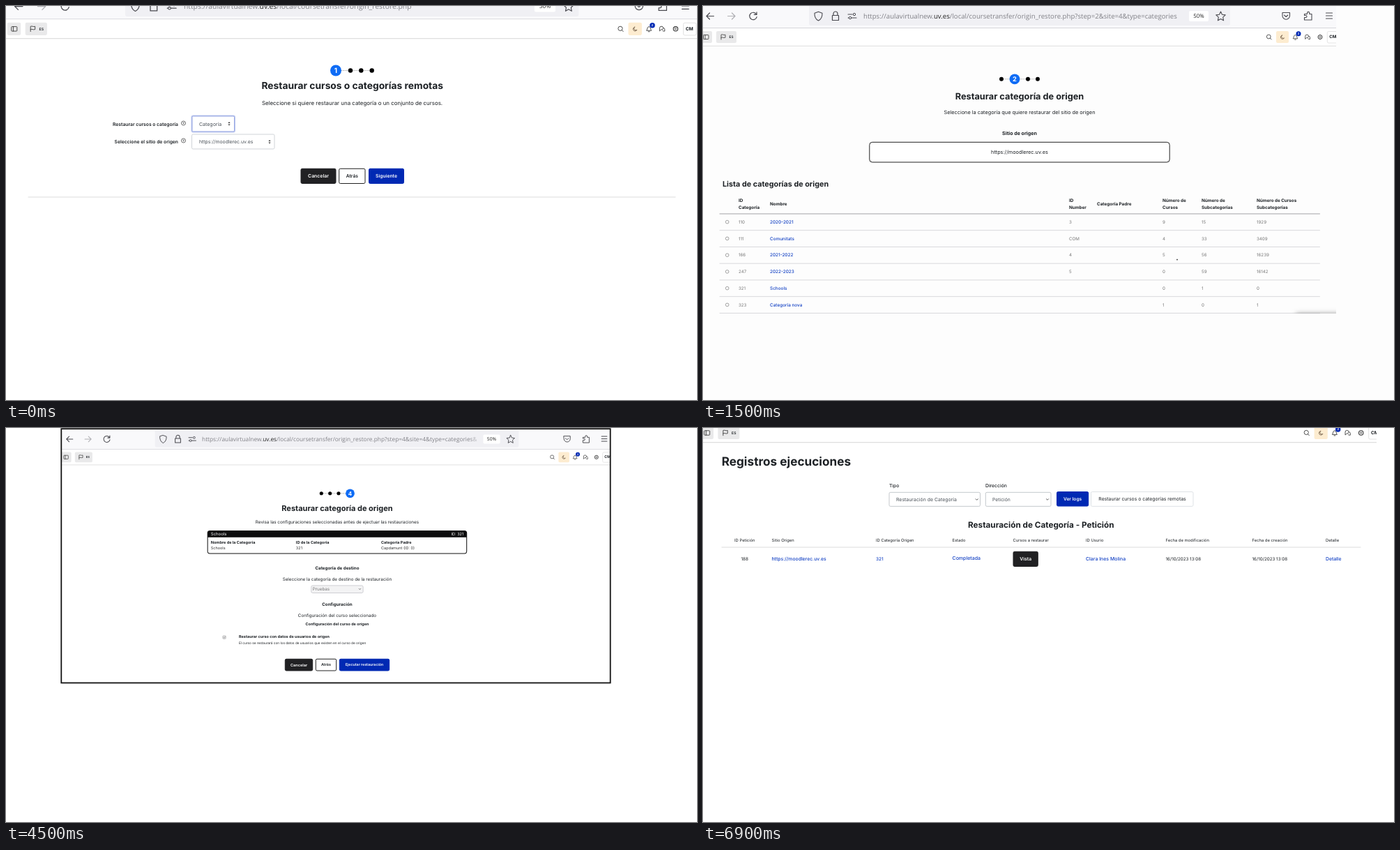
Recreate the animation shown at these times as an HTML page. Size 991 by 565 pixels, loop 7500 ms.

```html
<!DOCTYPE html>
<html lang="es">
<head>
<meta charset="utf-8">
<title>Restaurar cursos</title>
<style>
  html, body { margin: 0; width: 100%; height: 100%; overflow: hidden; background: #fff; }
  svg { display: block; width: 991px; height: 565px; }
  text { font-family: Inter, "Open Sans", sans-serif; text-rendering: geometricPrecision; white-space: pre; }
  .ui { font-family: "Open Sans", "Noto Sans", sans-serif; }
</style>
</head>
<body>
<svg id="stage" viewBox="0 0 991 565" xmlns="http://www.w3.org/2000/svg"></svg>
<script>
const INK = '#1d2125', DARK = '#212123', BLUE = '#0029b3', LINK = '#1240c4', GREY = '#777';
const WHITE = '#fff', PAPER = '#fdfdfd';
const SCENE_MS = 1500;

// y is the optical middle of the text
function text(x, y, str, size, { w = 400, fill = INK, at = 'start', cls = '' } = {}) {
  return `<text x="${x}" y="${y + size * 0.34}" font-size="${size}" font-weight="${w}" fill="${fill}" text-anchor="${at}" class="${cls}">${str}</text>`;
}
const mid = (x, y, str, size, o = {}) => text(x, y, str, size, { at: 'middle', ...o });
const bold = (x, y, str, size, o = {}) => text(x, y, str, size, { w: 700, ...o });
const title = (x, y, str, size, fill = INK) => mid(x, y, str, size, { w: 700, fill });

// box given by its edges
function box(x1, y1, x2, y2, fill, stroke = 'none', r = 0, sw = 1) {
  return `<rect x="${x1}" y="${y1}" width="${x2 - x1}" height="${y2 - y1}" rx="${r}" fill="${fill}" stroke="${stroke}" stroke-width="${sw}"/>`;
}
const path = (d, stroke = '#333', sw = 1, fill = 'none', dash = 'none') =>
  `<path d="${d}" fill="${fill}" stroke="${stroke}" stroke-width="${sw}" stroke-dasharray="${dash}" stroke-linecap="round" stroke-linejoin="round"/>`;
const dot = (x, y, r, fill, stroke = 'none', sw = 1) =>
  `<circle cx="${x}" cy="${y}" r="${r}" fill="${fill}" stroke="${stroke}" stroke-width="${sw}"/>`;
const rule = (x1, x2, y, color = '#dcdcdc', sw = 1) => path(`M${x1} ${y}H${x2}`, color, sw);
const chevron = (x, y) => path(`M${x - 1.6} ${y - 0.8}l1.6 1.6 1.6-1.6`, '#333', 0.8);
const sorter = (x, y) => path(`M${x - 1.6} ${y - 0.7}l1.6-2 1.6 2zM${x - 1.6} ${y + 0.7}l1.6 2 1.6-2z`, 'none', 0, '#333');

function button(x1, y1, x2, y2, str, size, fill) {
  const plain = fill === WHITE;
  return box(x1, y1, x2, y2, fill, plain ? '#222' : fill, 1.8) +
    mid((x1 + x2) / 2, (y1 + y2) / 2, str, size, { w: 600, fill: plain ? INK : WHITE });
}

function help(x, y) {
  return dot(x, y, 3, 'none', '#333', 0.7) + mid(x, y, '?', 4.6, { w: 600 });
}

function steps(xs, y, current, r) {
  return path(`M${xs[0]} ${y}H${xs[3]}`, '#999', 0.7, 'none', '1 1.6') +
    xs.map((x, i) => i + 1 === current
      ? dot(x, y, r, '#0f6cf5') + title(x, y, current, r * 1.25, WHITE)
      : dot(x, y, r * 0.4, '#000')).join('');
}

function browserBar(query, fade) {
  const ic = '#4a4a50';
  const host = '<tspan fill="#222">uv.es</tspan>';
  const url = `https://aulavirtualnew.${host}/local/coursetransfer/origin_restore.php${query}`;
  return box(-60, -5, 1000, 31, '#f9f9fb') + box(152, -1, 756, 28, '#f0f0f4', 'none', 3) +
    rule(-60, 1000, 31.5, '#d6d6da') +
    path('M15.5 14.5H5M9.5 10L5 14.5 9.5 19', ic, 1.2) +
    path('M35.5 14.5H46M41.5 10L46 14.5 41.5 19', '#b0b0b4', 1.2) +
    path('M76.6 12a5.2 5.2 0 1 0 .5 3.6M77 8.8V12.4H73.4', ic, 1.2) +
    path('M165.5 8.3L171 10.2C171.2 15.5 169.3 19 165.5 21 161.7 19 159.8 15.5 160 10.2Z', ic, 1.1) +
    path('M185.5 13.5H194.5V20.5H185.5ZM187 13.5V11a3 3 0 0 1 6 0V13.5', ic, 1.2) +
    path('M208 12H214M208 17H209M213 17H220', ic, 1.1) +
    dot(217, 12, 1.7, 'none', ic) + dot(211, 17, 1.7, 'none', ic) +
    text(230, 14.5, url, 9.64, { fill: '#818187', cls: 'ui' }) +
    (fade ? box(674, 3, 692, 26, 'url(#fade)') : '') +
    box(697, 7, 725, 22, WHITE, 'none', 2) + mid(711, 14.5, '50%', 7.8, { fill: '#222', cls: 'ui' }) +
    path('M742.5 8l2 4.3 4.7.6-3.5 3.2.9 4.7-4.1-2.3-4.1 2.3.9-4.7-3.5-3.2 4.7-.6Z', ic, 1.1) +
    path('M831 9.5H841.5V14a5.2 5.2 0 0 1-10.5 0ZM833.5 13l2.7 2.5 2.7-2.5', ic, 1.1) +
    path('M862.5 20V16.5h2a1.5 1.5 0 0 0 0-3h-2V11.5h4V10a1.6 1.6 0 0 1 3.2 0V11.5H873V20Z', ic, 1.1) +
    path('M893.5 10H902.5M893.5 14H902.5M893.5 18H902.5', ic, 1.2);
}

function navBar() {
  const ic = '#333';
  return box(-60, 32, 1000, 57, WHITE) + rule(-60, 1000, 57.3, '#dedede') +
    box(-5, 36, 13, 53, '#e9e9ea', 'none', 2) + box(19, 36, 48, 53, '#e9e9ea', 'none', 2) +
    box(0.5, 41.5, 8, 47.5, 'none', ic, 0.8, 0.8) + path('M3 41.5V47.5', ic, 0.8) +
    path('M26 48V41.2C28 40.2 29.5 42.2 32 41.2V45.2C29.5 46.2 28 44.2 26 45.2', ic, 0.8) +
    mid(40.5, 44.5, 'ES', 4.8, { w: 600 }) +
    dot(811.3, 44, 2.9, 'none', ic, 0.8) + path('M813.5 46.2L815.2 48', ic, 0.8) +
    box(822, 36, 840, 53, '#fdecd0', 'none', 2) +
    path('M830.5 42a2.7 2.7 0 1 0 3 3.8 2.4 2.4 0 0 1-3-3.8Z', '#6b5640', 0.8) +
    path('M846.5 46.5C847.5 45.5 847 41.5 849.5 41.5S851.5 45.5 852.5 46.5ZM848.7 48.2H850.3', ic, 0.8) +
    dot(854, 39.8, 3.5, BLUE) + mid(854, 39.8, '2', 4, { w: 600, fill: WHITE }) +
    path('M863.7 47V43.5a2.4 2.4 0 0 1 4.8 0 2.2 2.2 0 0 1-2.4 2ZM867.5 46.7a2 2 0 0 0 1.5.8H870.5V45.2a2 2 0 0 0-1.5-2', ic, 0.8) +
    dot(885, 44.5, 3, 'none', ic, 1) + dot(885, 44.5, 1.1, 'none', ic, 0.7) +
    box(895.3, 36.5, 912.5, 53, WHITE, '#ddd', 2, 0.8) + mid(903.4, 44, 'CM', 6.1, { w: 700 });
}

const chrome = (x, y, k, query, fade) =>
  `<g transform="translate(${x} ${y}) scale(${k})">${browserBar(query, fade)}${navBar()}</g>`;

// Category card, target select and options, common to two pages
function config(open) {
  const soft = '#333';
  const head = [[224, 'Nombre de la Categoría', 'Schools'], [380, 'ID de la Categoría', '321'], [536, 'Categoría Padre', 'Capdamunt (ID: 0)']];
  return box(218.2, 186.5, 692.7, 227.8, WHITE, '#111', 4, 1.3) +
    path('M218.2 198V190.5a4 4 0 0 1 4-4H688.7a4 4 0 0 1 4 4V198Z', 'none', 0, '#0c0c0d') +
    text(224, 192.3, 'Schools', 7.7, { fill: WHITE }) + text(687, 192.3, 'ID: 321', 7.1, { fill: WHITE, at: 'end' }) +
    head.map(([x, a, b]) => bold(x, 208, a, 7.1) + text(x, 217.5, b, 7.1, { fill: soft })).join('') +
    title(455.5, 254.7, 'Categoría de destino', 7.95) +
    mid(455.5, 275, 'Seleccione la categoría de destino de la restauración', 8) +
    (open ? box(408.5, 287, 502, 299, '#d2d2d8', '#7d7d88', 2, 1) : box(408, 286.5, 503, 300, '#f3f3f4', '#c4c4ca', 2.5)) +
    text(410.5, 293, 'Pruebas', 8, { fill: open ? '#000' : '#777' }) + chevron(497, 293) +
    title(455.5, 321, 'Configuración', 7.95) +
    mid(455.5, 341.5, 'Configuración del curso seleccionado', 8) +
    title(455.5, 356.5, 'Configuración del curso de origen', 7) +
    box(246, 378.5, 251.5, 384, open ? WHITE : '#e4e4e6', open ? '#777' : '#aaa', 1, 0.9) +
    (open ? '' : path('M247.3 381.3l1.2 1.3 2-2.6', '#888', 0.8)) +
    bold(275.5, 380, 'Restaurar curso con datos de usuarios de origen', 7.04) +
    text(275.5, 391.3, 'El curso se restaurará con los datos de usuarios que existen en el curso de origen', 6.03);
}

function pickType() {
  return chrome(7.2, -15.1, 1.077, '', false) +
    steps([473, 494, 509.3, 524.7], 92.5, 1, 8) +
    title(496.7, 114.3, 'Restaurar cursos o categorías remotas', 13.8) +
    mid(496.5, 139, 'Seleccione si quiere restaurar una categoría o un conjunto de cursos.', 7.92) +
    text(247, 169.3, 'Restaurar cursos o categoría', 6.75, { w: 600, at: 'end' }) + help(254.5, 168) +
    text(247, 194.7, 'Seleccione el sitio de origen', 6.75, { w: 600, at: 'end' }) + help(254.5, 193) +
    box(266.5, 157.5, 328, 180.5, WHITE, '#c3cdf0', 2, 2.2) + box(267, 158, 327.5, 180, WHITE, '#7f93dc', 1.5, 0.8) +
    text(277, 169.3, 'Categoría', 7, { fill: '#495057' }) + sorter(320, 168.7) +
    box(266.5, 184, 385, 205, WHITE, '#d0d4d8', 1.8) +
    text(277, 194.7, 'https://moodlerec.uv.es', 6.9, { fill: '#495057' }) + sorter(378, 194.7) +
    button(423, 233.3, 473, 254.5, 'Cancelar', 6.9, DARK) +
    button(477.7, 233.3, 515, 254.5, 'Atrás', 6.7, WHITE) +
    button(520.5, 233.3, 570.5, 254.5, 'Siguiente', 6.8, BLUE) +
    rule(32, 960, 274);
}

function pickCategory() {
  const cols = [51, 96, 525, 565, 659, 715, 794];
  const heads = ['ID|Categoría', 'Nombre', 'ID|Number', 'Categoría Padre', 'Número de|Cursos', 'Número de|Subcategorías', 'Número de Cursos|Subcategorías'];
  const rows = [
    '110,2020-2021,3,,9,15,1929', '111,Comunitats,COM,,4,33,3409', '166,2021-2022,4,,5,56,16239',
    '247,2022-2023,5,,0,59,16142', '321,Schools,,,0,1,0', '323,Categoría nova,,,1,0,1'];
  const table = heads.map((h, c) => {
    const lines = h.split('|');
    return lines.map((s, i) => bold(cols[c], 283.7 + (i - (lines.length - 1) / 2) * 9.6, s, 6.3)).join('');
  }).join('') + rows.map((row, r) => {
    const y = 309.7 + r * 23.75;
    return dot(34.7, y, 2.3, WHITE, '#888', 0.8) + rule(24, 884.5, y + 12, '#d9d9dc') +
      row.split(',').map((s, c) => text(cols[c], y, s, c === 1 ? 6.4 : 6.2, c === 1 ? { w: 500, fill: LINK } : { fill: GREY })).join('');
  }).join('');
  return chrome(0, 0, 1, '?step=2&amp;site=4&amp;type=categories', false) +
    steps([428, 447, 466, 480], 104.8, 2, 7.4) +
    title(454, 130, 'Restaurar categoría de origen', 12.75) +
    mid(454, 153, 'Seleccione la categoría que quiere restaurar del sitio de origen', 7.33) +
    title(454, 182.3, 'Sitio de origen', 7.1) +
    box(238.8, 195.3, 669.2, 224, WHITE, '#222', 4) +
    mid(454, 209.5, 'https://moodlerec.uv.es', 7.3) +
    bold(28, 255, 'Lista de categorías de origen', 10.8) +
    rule(24, 884.5, 298, '#a2a2a6') + table +
    `<g filter="url(#soft)">${box(850, 441, 920, 450, '#999', 'none', 3)}</g>` + dot(680, 363.7, 0.9, '#333');
}

function pickTarget() {
  const options = ['Categoría nueva', 'Pruebas', '2020-2021', 'Categoría nueva', 'New category', 'New category',
    'Category 1', '2020-2021 &gt; 2020-2021', '2020-2021 &gt; 2020-2021 &gt; Numbers'];
  return chrome(-45.4, -7.4, 1.103, '?step=3&amp;site=4&amp;type=categories&amp;', true) +
    title(455.3, 72.3, 'Restaurar categoría de origen', 14.1) +
    mid(455.5, 97.7, 'Seleccione la categoría de destino y la configuración a aplicar en la restauración', 8.06) +
    title(455.5, 130, 'Sitio de origen', 7.8) +
    box(218.2, 144.5, 692.7, 176, WHITE, '#222', 4, 1.1) +
    mid(455.5, 160, 'https://moodlerec.uv.es', 8.06) +
    config(true) +
    button(380, 435.5, 431, 457, 'Cancelar', 7.2, DARK) +
    button(436, 435.5, 474, 457, 'Atrás', 6.9, WHITE) +
    button(479.5, 435.5, 530.5, 457, 'Siguiente', 7, BLUE) +
    box(408, 298.5, 538.7, 439.7, '#f9f9fb', '#8f8f9d', 3) +
    box(409, 317.2, 538, 331.7, '#e0e0e6') +
    options.map((s, i) => text(414.7, 310 + i * 14.75, s, 6.95, { fill: '#000' })).join('') +
    rule(0, 961, 477) +
    text(-0.5, 495.7, 'e paragraph lorem ipsum dolar set...', 6.04) +
    `<g filter="url(#soft)">${box(889, 480, 959, 498, '#bbb', 'none', 3)}</g>` +
    box(889, 478.5, 959, 497, WHITE, '#e8e8e8', 3, 0.7) +
    box(894.5, 485, 904, 491.5, WHITE, '#888', 3.2, 0.7) + dot(898, 488.2, 1.5, '#888') +
    text(909, 488.2, 'Modo de edición', 5.6);
}

function review() {
  return chrome(82.4, 3.4, 0.8637, '?step=4&amp;site=4&amp;type=categories&amp;', true) +
    steps([452.3, 464.7, 477, 493.5], 93.8, 4, 6.4) +
    title(475, 115.3, 'Restaurar categoría de origen', 11.03) +
    mid(475, 135.2, 'Revisa las configuraciones seleccionadas antes de ejectuar las restauraciones', 6.33) +
    `<g transform="translate(118.3 1.6) scale(.783)">${config(false)}</g>` +
    button(400.3, 331.3, 439.7, 348, 'Cancelar', 5.6, DARK) +
    button(444.3, 331.3, 473.7, 348, 'Atrás', 5.4, WHITE) +
    button(478.3, 331.3, 549.7, 348, 'Ejecutar restauración', 5.3, BLUE);
}

function logs() {
  const link = { w: 500, fill: LINK };
  const heads = [[45, 'ID Petición'], [98.5, 'Sitio Origen'], [248, 'ID Categoría Origen'], [357.5, 'Estado'], [444.5, 'Cursos a restaurar'],
    [549, 'ID Usurio'], [663.5, 'Fecha de modificación'], [787.5, 'Fecha de creación'], [893, 'Detalle']];
  return chrome(1.2, -40.4, 1.065, '', false) +
    bold(26.7, 48.3, 'Registros ejecuciones', 17.2) +
    text(267, 83, 'Tipo', 6.7, { w: 500 }) + text(405, 83, 'Dirección', 6.8, { w: 500 }) +
    box(267, 92.3, 397.5, 112.3, WHITE, '#c4c8cc', 1.8) + text(277, 102.5, 'Restauración de Categoría', 6.95, { fill: '#495057' }) + chevron(392.7, 102.5) +
    box(405.3, 92.3, 499, 112.3, WHITE, '#c4c8cc', 1.8) + text(415, 102.5, 'Petición', 6.8, { fill: '#495057' }) + chevron(494, 102.5) +
    button(507.5, 91.5, 552.7, 112, 'Ver logs', 6.6, BLUE) +
    box(556.5, 91.5, 703, 112.3, WHITE, '#dee2e6', 1.8) + mid(630, 101.8, 'Restaurar cursos o categorías remotas', 6.87) +
    title(484.8, 139.3, 'Restauración de Categoría - Petición', 11.75) +
    heads.map(([x, s]) => text(x, 160.7, s, 5.85)).join('') +
    rule(27, 943, 171) +
    text(54.5, 187.7, '188', 6.4) + text(98.5, 187.7, 'https://moodlerec.uv.es', 6.85, link) + text(248, 187.7, '321', 6.4, link) +
    text(357.5, 186.3, 'Completada', 7, link) + button(445, 177.3, 480.3, 198.5, 'Vista', 6.8, DARK) +
    text(549, 187.7, 'Clara Ines Molina', 6.95, link) +
    text(663.5, 187.7, '16/10/2023 13:08', 6.25) + text(787.5, 187.7, '16/10/2023 13:08', 6.25) + text(893, 187.7, 'Detalle', 6.8, link);
}

// page, stage colour, then the edges the page is clipped to
const pages = [
  [pickType, WHITE, 0, 0, 991, 565],
  [pickCategory, PAPER, 0, 0, 908, 441],
  [pickTarget, PAPER, 0, 0, 961, 500],
  [review, WHITE, 79, 1, 867, 366],
  [logs, WHITE, 0, 0, 966, 367]
];

const stage = document.getElementById('stage');
stage.innerHTML = `<defs>
  <linearGradient id="fade"><stop offset="0" stop-color="#f0f0f4" stop-opacity="0"/><stop offset="1" stop-color="#f0f0f4"/></linearGradient>
  <filter id="soft" x="-30%" y="-120%" width="160%" height="340%"><feGaussianBlur stdDeviation="3.5"/></filter>
  ${pages.map(([, , ...edges], i) => `<clipPath id="clip${i}">${box(...edges, '#000')}</clipPath>`).join('')}
</defs>` + pages.map(([draw, back], i) =>
  `<g class="page" display="none">${box(0, 0, 991, 565, back)}<g clip-path="url(#clip${i})">${draw()}</g>${draw === review ? box(79.3, 1.2, 866.7, 365.5, 'none', '#111', 0, 1.8) : ''}</g>`).join('');

const groups = [...stage.querySelectorAll('.page')];
const start = performance.now();
function tick() {
  const now = Math.floor((performance.now() - start) / SCENE_MS) % pages.length;
  groups.forEach((g, i) => g.setAttribute('display', i === now ? 'inline' : 'none'));
  requestAnimationFrame(tick);
}
tick();
</script>
</body>
</html>
```
